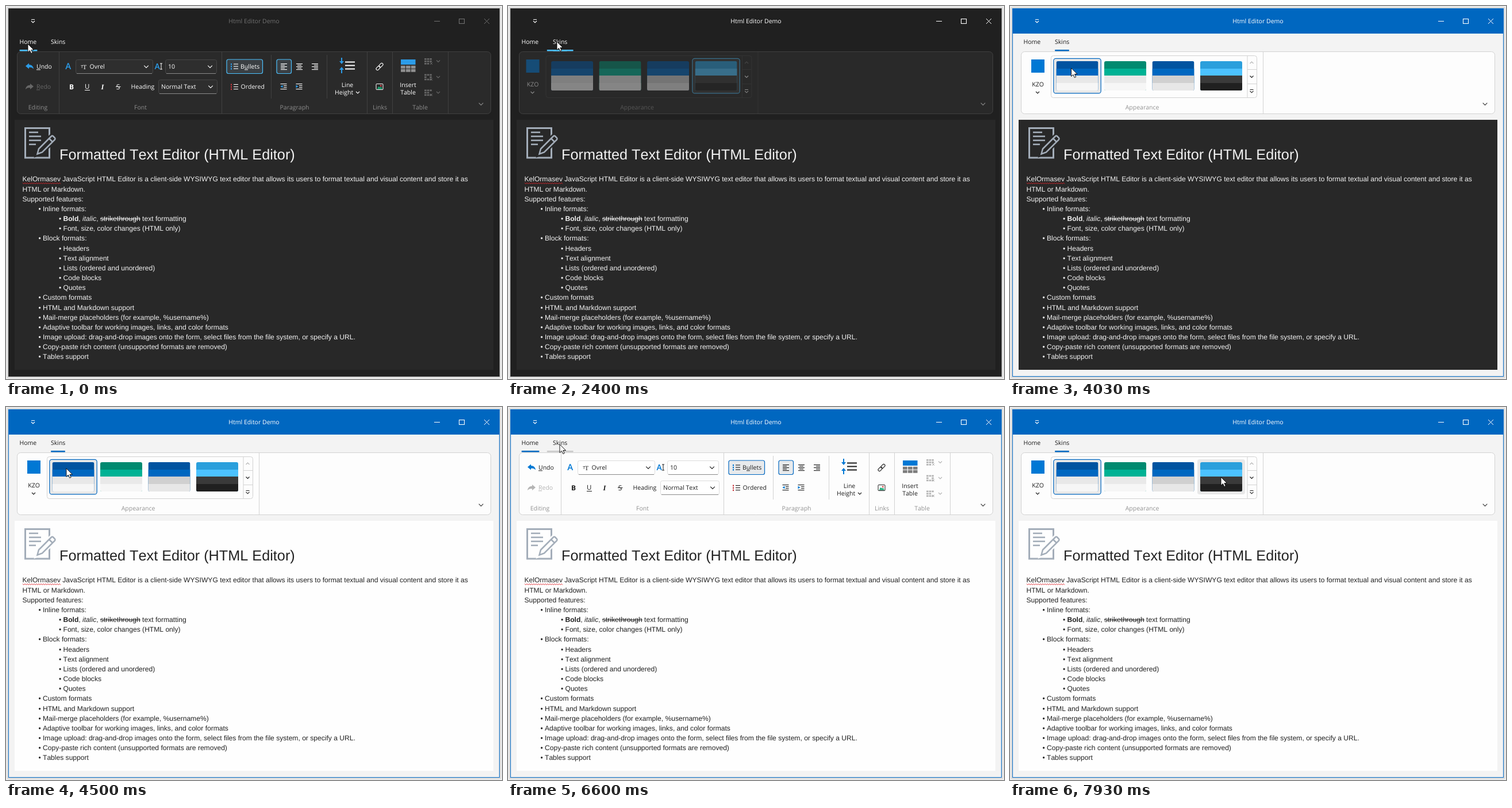
An HTML page with a canvas for the animation above (8000 ms loop, 863 by 649 pixels).

```html
<!DOCTYPE html>
<html lang="en">
<head>
<meta charset="utf-8">
<title>Html Editor Demo</title>
<style>
html, body { margin: 0; width: 100%; height: 100%; overflow: hidden; }
canvas { display: block; width: 863px; height: 649px; }
</style>
</head>
<body>
<canvas id="stage" width="863" height="649"></canvas>
<script>
const ctx = document.getElementById('stage').getContext('2d');
const LOOP = 8000;
const UI = '"Open Sans", "Noto Sans", sans-serif';
const DOC = '"Liberation Sans", sans-serif';

const DARK = {
  bg: '#202020', title: '#202020', border: '#343434', panel: '#2a2a2a', line: '#404040', box: '#2e2e2e',
  boxLine: '#464646', boxBase: '#8a8a8a', text: '#ffffff', label: '#8c8c8c', off: '#676767', fold: '#8c8c8c',
  accent: '#4cc2ff', icon: '#2c9ce8', cell: '#8f8f8f', checked: '#3a3f43', hover: '#3c3c3c', tabHover: '#4a4a4a',
  page: '#282828', ink: '#f2f2f2'
};
const LIGHT = {
  bg: '#f3f3f3', title: '#0067c0', border: '#0067c0', panel: '#fdfdfd', line: '#d2d2d2', box: '#ffffff',
  boxLine: '#dcdcdc', boxBase: '#8a8a8a', text: '#1c1c1c', label: '#929292', off: '#b4b4b4', fold: '#333333',
  accent: '#0067c0', icon: '#0078d4', cell: '#7d7d7d', checked: '#e8eaec', hover: '#e8e8e8', tabHover: '#c8c8c8',
  page: '#fefefe', ink: '#222222'
};
const SWATCHES = [
  ['#0053a0', '#0067c0', '#e8e8e8', '#f6f6f6'],
  ['#008a70', '#00b294', '#e9e9e9', '#f6f6f6'],
  ['#0053a0', '#0067c0', '#d0d0d0', '#e7e7e7'],
  ['#2a9fdc', '#4cc2ff', '#3a3a3a', '#202020']
];
const TABS = [{ name: 'Home', x: 23.5, w: 31 }, { name: 'Skins', x: 78, w: 25 }];

// Pointer moves: start, end, from, to
const MOVES = [
  [1500, 2300, [38, 66], [85, 62]],
  [3130, 3640, [85, 62], [106.5, 108]],
  [4430, 5160, [106.5, 108], [48, 64]],
  [6060, 6600, [48, 64], [90, 65]],
  [7400, 7930, [90, 65], [367, 122]]
];
// Tab hovers: tab, enter, leave
const HOVERS = [[0, 460, 1900], [1, 1950, 3480], [0, 4900, 6290], [1, 6320, 7520]];
const SWITCHES = [2330, 5430, 6760];

const clamp = v => Math.max(0, Math.min(1, v));
const ease = v => v * v * (3 - 2 * v);

function text(s, x, y, color, size = 10.5, align = 'left', font = UI, style = '') {
  ctx.font = `${style} ${size}px ${font}`;
  ctx.textAlign = align;
  ctx.fillStyle = color;
  ctx.fillText(s, x, y);
  return ctx.measureText(s).width;
}
function rect(x, y, w, h, color) {
  ctx.fillStyle = color;
  ctx.fillRect(x, y, w, h);
}
function round(x, y, w, h, r, fill, stroke, width = 1) {
  ctx.beginPath();
  ctx.roundRect(x, y, w, h, r);
  if (fill) { ctx.fillStyle = fill; ctx.fill(); }
  if (stroke) { ctx.strokeStyle = stroke; ctx.lineWidth = width; ctx.stroke(); }
}
function lines(points, color, width = 1) {
  ctx.beginPath();
  points.forEach(([x, y]) => ctx.lineTo(x, y));
  ctx.strokeStyle = color;
  ctx.lineWidth = width;
  ctx.stroke();
}
function shape(d, fill, stroke, width = 1) {
  const p = new Path2D(d);
  if (fill) { ctx.fillStyle = fill; ctx.fill(p); }
  if (stroke) { ctx.strokeStyle = stroke; ctx.lineWidth = width; ctx.stroke(p); }
}
function at(x, y, draw) {
  ctx.save();
  ctx.translate(x, y);
  draw();
  ctx.restore();
}
const chevron = (x, y, color, r = 3, dir = 1) =>
  lines([[x - r, y - dir * r / 2], [x, y + dir * r / 2], [x + r, y - dir * r / 2]], color, 1.1);
const vline = (x, y1, y2, color) => rect(x - .5, y1, 1, y2 - y1, color);

function pointer(t) {
  let pos = MOVES[0][2];
  for (const [start, end, a, b] of MOVES) {
    if (t < start) break;
    const k = ease(clamp((t - start) / (end - start)));
    pos = [a[0] + (b[0] - a[0]) * k, a[1] + (b[1] - a[1]) * k];
  }
  return pos;
}

function drawFrame(T, t) {
  rect(0, 0, 863, 649, '#f0f0f0');
  round(2.5, 2.5, 858, 644, 2, null, '#d8d8d8', 2);
  rect(4, 4, 855, 641, T.bg);
  rect(4, 4, 855, 44, T.title);
  ctx.strokeStyle = T.border;
  ctx.lineWidth = 1;
  ctx.strokeRect(4.5, 4.5, 854, 640);

  const shade = Math.round(112 + 143 * clamp((t - 430) / 140));
  const color = `rgb(${shade},${shade},${shade})`;
  rect(44, 23, 6, 1, '#fff');
  chevron(47, 27.5, '#fff');
  text('Html Editor Demo', 431.5, 30, color, 10.5, 'center');
  rect(745, 26, 10, 1, color);
  ctx.strokeStyle = color;
  ctx.strokeRect(788.5, 22.5, 9, 8);
  lines([[832, 22], [841, 31]], color);
  lines([[841, 22], [832, 31]], color);
}

function drawTabs(T, t, selected) {
  TABS.forEach(tab => text(tab.name, tab.x, 66, T.text));
  HOVERS.forEach(([i, enter, leave]) => {
    const { x, w } = TABS[i];
    ctx.globalAlpha = Math.min(clamp((t - enter) / 130), 1 - clamp((t - leave) / 200));
    round(x - 10.3, 76, w + 21, 2.6, 1, i === selected ? T.accent : T.tabHover);
  });
  ctx.globalAlpha = 1;
  const { x, w } = TABS[selected];
  round(x, 76, w, 2.6, 1, T.accent);
}

function combo(T, x, y, w, label, textX) {
  round(x + .5, y + .5, w - 1, 24, 3, T.box, T.boxLine);
  rect(x + 2, y + 24, w - 4, 1, T.boxBase);
  text(label, textX, y + 16, T.text);
  chevron(x + w - 12, y + 12.5, T.text, 3.8);
}
function rows(x, y, widths, color, align) {
  widths.forEach((w, i) => rect(Math.round(x + align * (11 - w)), y - 5 + i * 2.5, w, 1.1, color));
}
function listIcon(y, color, marks) {
  [-4, 0, 4].forEach(dy => {
    rect(391, y + dy - 1, 2, 2.6, marks);
    rect(396, y + dy - .5, 8, 1.1, color);
  });
}
function indent(T, x, dir) {
  [-5, 4].forEach(dy => rect(x - 5.5, 140 + dy, 11, 1.1, T.text));
  [-2, 1].forEach(dy => rect(x, 140 + dy, 5.5, 1.1, T.text));
  shape(`M${x - 3.5 - 2 * dir} 137.5V142.5L${x - 3.5 + 2 * dir} 140Z`, T.icon);
}
function tableAction(T, y, gap) {
  for (let i = 0; i < 9; i++) {
    if (i === gap) continue;
    rect(728 + i % 3 * 4.6, y - 5 + Math.floor(i / 3) * 4, 3.6, 2.7, T.off);
  }
  lines([[738, y + 2], [742, y + 6]], T.off);
  lines([[742, y + 2], [738, y + 6]], T.off);
  chevron(752, y, T.off);
}

function drawHome(T) {
  [93, 376, 629, 673, 770].forEach(x => vline(x - .5, 80, 187, T.line));
  [461.5, 558.5].forEach(x => vline(x, 85, 161, T.line));
  [['Editing', 55.5], ['Font', 234], ['Paragraph', 502], ['Links', 650.5], ['Table', 720.5]]
    .forEach(([s, x]) => text(s, x, 179.5, T.label, 10.5, 'center'));

  const arrow = 'M34 104.5L40 99.5V102.3C45 102.3 47.5 105 48 109.5C46 107 43.5 106.6 40 106.7V109.5Z';
  shape(arrow, T.icon);
  at(82, 35.5, () => { ctx.scale(-1, 1); shape(arrow, T.off); });
  text('Undo', 53, 109, T.text);
  rect(53, 110.3, 7, 1, T.text);
  text('Redo', 53, 144, T.off);
  rect(53, 145.3, 6, 1, T.off);

  text('A', 103.3, 110.3, T.icon, 15, 'left', UI, '600');
  combo(T, 121, 93, 135, 'Ovrel', 145.5);
  text('T', 130, 108, T.text, 7, 'left', DOC);
  text('T', 133.5, 109.5, T.text, 11, 'left', '"Liberation Serif", serif');
  text('A', 258.5, 110, T.icon, 14, 'left', UI, '600');
  shape('M268 100H272M270 100V110M268 110H272', null, T.text);
  combo(T, 277, 93, 90, '10', 282);

  text('B', 114, 144.5, T.text, 12, 'center', UI, 'bold');
  text('U', 141.3, 144, T.text, 11.5, 'center');
  rect(137, 146, 9, 1, T.text);
  text('I', 168, 144.5, T.text, 12.5, 'center', '"Liberation Serif", serif', 'italic bold');
  text('S', 195, 144.5, T.text, 12, 'center');
  rect(191, 140, 8.5, 1, T.text);
  text('Heading', 217.5, 144, T.text);
  combo(T, 265, 128, 103, 'Normal Text', 270);

  round(384, 93, 62.5, 24.5, 3, T.checked, T.accent, 1.2);
  listIcon(105, T.text, T.icon);
  text('Bullets', 408, 109, T.text);
  rect(415, 110.3, 6, 1, T.text);
  listIcon(140.5, T.text, '#c8373c');
  text('Ordered', 408.5, 144, T.text);

  round(471, 93, 25.5, 24.5, 3, T.checked, T.accent, 1.2);
  const widths = [11, 7, 11, 7, 11];
  rows(478, 105, widths, T.text, 0);
  rows(505, 105, widths, T.text, .5);
  rows(532, 105, widths, T.text, 1);
  indent(T, 483, -1);
  indent(T, 510, 1);

  [97, 103, 109].forEach(y => rect(590, y - .5, 17, 2, T.text));
  shape('M583 90H585V96H588L584 101L580 96H583ZM583 117H585V111H588L584 106L580 111H583Z', T.icon);
  text('Line', 594, 141, T.text, 10.5, 'center');
  text('Height', 572, 154, T.text);
  chevron(612, 150.5, T.text);

  at(650, 105.5, () => {
    ctx.rotate(-Math.PI / 4);
    round(-7.5, -2.3, 8, 4.6, 2.3, null, T.text, 1.1);
    round(-.5, -2.3, 8, 4.6, 2.3, null, T.text, 1.1);
  });
  round(644, 135.5, 12, 10, 1, null, T.text);
  shape('M645.5 144.5L648.5 140L651 142L652.5 140.5L655 144.5Z', '#17a673');
  rect(651, 137.5, 2.5, 2.5, '#d9474c');

  rect(687, 93, 25.5, 9, T.icon);
  for (let i = 0; i < 6; i++) rect(687 + i % 3 * 8.9, 103.8 + Math.floor(i / 3) * 6, 7.7, 5, T.cell);
  text('Insert', 699.5, 141, T.text, 10.5, 'center');
  text('Table', 699.5, 154, T.text, 10.5, 'center');
  tableAction(T, 96, 8);
  tableAction(T, 123.5, 4);
  tableAction(T, 150.5, 5);
}

function drawSkins(T, mouse) {
  const selected = T === DARK ? 3 : 0;
  rect(37, 93, 23, 23, '#0078d4');
  text('KZO', 48.5, 140, T.text, 10.5, 'center');
  chevron(48, 150.5, T.text);
  round(71.5, 86.5, 358, 73, 4, null, T.line);
  vline(413, 87, 159, T.line);
  [110, 135].forEach(y => rect(413, y, 16, 1, T.line));
  chevron(420.5, 98.5, T.off, 3, -1);
  chevron(420.5, 123, T.text);
  rect(417.5, 145, 6, 1, T.text);
  chevron(420.5, 149.3, T.text);

  SWATCHES.forEach((bands, i) => {
    const x = 80.5 + i * 83.5;
    const hovered = mouse[0] > x - 5 && mouse[0] < x + 78 && mouse[1] > 91 && mouse[1] < 152;
    if (i === selected) round(x - 4.7, 91.3, 82.4, 60.6, 4, T.hover, T.accent, 1.2);
    else if (hovered) round(x - 5, 91, 83, 61, 4, T.hover);
    ctx.save();
    ctx.beginPath();
    ctx.roundRect(x, 96, 73, 51, 3);
    ctx.clip();
    // Each band covers the rest of the swatch, so no seams show.
    bands.forEach((color, b) => rect(x, 96 + Math.round(b * 12.7), 73, 51, color));
    ctx.restore();
  });
  text('Appearance', 230, 179.5, T.label, 10.5, 'center');
  vline(440.5, 80, 187, T.line);
}

function drawRibbon(T, t, mouse) {
  const past = SWITCHES.filter(s => t >= s);
  const onSkins = past.length % 2 === 1;
  const k = past.length ? clamp((t - past[past.length - 1] + 33) / 228) : 1;
  round(19.5, 79.5, 824, 108, 6, T.panel);
  at(-10 * (1 - k), 0, () => onSkins ? drawSkins(T, mouse) : drawHome(T));
  // A veil fades the content in as one layer.
  ctx.globalAlpha = 1 - k;
  round(19.5, 79.5, 824, 108, 6, T.panel);
  ctx.globalAlpha = 1;
  round(19.5, 79.5, 824, 108, 6, null, T.line);
  drawTabs(T, t, onSkins ? 1 : 0);
  chevron(826.5, 170.5, T.fold, 3.8);
}

// Leading dots give the list depth.
const BODY = `KelOrmasev JavaScript HTML Editor is a client-side WYSIWYG text editor that allows its users to format textual and visual content and store it as
HTML or Markdown.
Supported features:
.Inline formats:
..*
..Font, size, color changes (HTML only)
.Block formats:
..Headers
..Text alignment
..Lists (ordered and unordered)
..Code blocks
..Quotes
.Custom formats
.HTML and Markdown support
.Mail-merge placeholders (for example, %username%)
.Adaptive toolbar for working images, links, and color formats
.Image upload: drag-and-drop images onto the form, select files from the file system, or specify a URL.
.Copy-paste rich content (unsupported formats are removed)
.Tables support`.split('\n');

function drawDocument(T) {
  const put = (s, x, y, style) => text(s, x, y, T.ink, 12.09, 'left', DOC, style);
  rect(15, 198, 833, 435, T.page);

  const gray = '#a3adb9';
  ctx.strokeStyle = gray;
  ctx.lineWidth = 3;
  ctx.strokeRect(33.5, 212.5, 42, 51.5);
  [[220, 16], [227, 21], [234, 21], [241, 12]].forEach(([y, w]) => rect(40, y - 1.5, w, 2.6, gray));
  shape('M54 258L57 248L79 226Q81 224 83 226L85 228Q87 230 85 232L64 254Z', T.page, T.page, 7);
  shape('M54.5 257.5L57 248.5L79 226.5Q80.5 225 82 226.5L85 229.5Q86 231 85 232.5L63 254.5ZM75 230.5L81 236.5', null, gray, 2.5);

  text('Formatted Text Editor (HTML Editor)', 93, 267.3, T.ink, 25.25, 'left', DOC);
  BODY.forEach((row, i) => {
    const depth = row.match(/^\.*/)[0].length;
    const y = 305.4 + i * 17.17;
    let x = [28.5, 64, 99.5][depth];
    if (depth) put('•', x - 7.5, y);
    const s = row.slice(depth);
    if (s !== '*') { put(s, x, y); return; }
    x += put('Bold', x, y, 'bold');
    x += put(', ', x, y);
    x += put('italic', x, y, 'italic');
    x += put(', ', x, y);
    const w = put('strikethrough', x, y);
    rect(x, Math.round(y - 4), w, 1, T.ink);
    put(' text formatting', x + w, y);
  });
  const wave = Array.from({ length: 34 }, (_, i) => [29 + i * 2, i % 2 ? 309.5 : 307.5]);
  lines(wave, '#e0262c');
}

function drawPointer([x, y]) {
  at(x, y, () => shape('M0 0V14.5L3.4 11.4L5.8 16.6L8.2 15.5L5.9 10.5H10.5Z', '#fff', '#000', .9));
}

function render(t) {
  const mouse = pointer(t);
  ctx.fontKerning = 'none';
  ctx.textRendering = 'geometricPrecision';
  const theme = t < 3960 ? DARK : LIGHT;
  drawFrame(t < 3930 ? DARK : LIGHT, t);
  if (theme === DARK && t >= 3930) rect(5, 48, 853, 596, DARK.bg);
  drawRibbon(theme, t, mouse);
  drawDocument(t < 4160 ? DARK : LIGHT);
  drawPointer(mouse);
}

const origin = performance.now();
function tick() {
  render((performance.now() - origin) % LOOP);
  requestAnimationFrame(tick);
}
tick();
</script>
</body>
</html>
```
